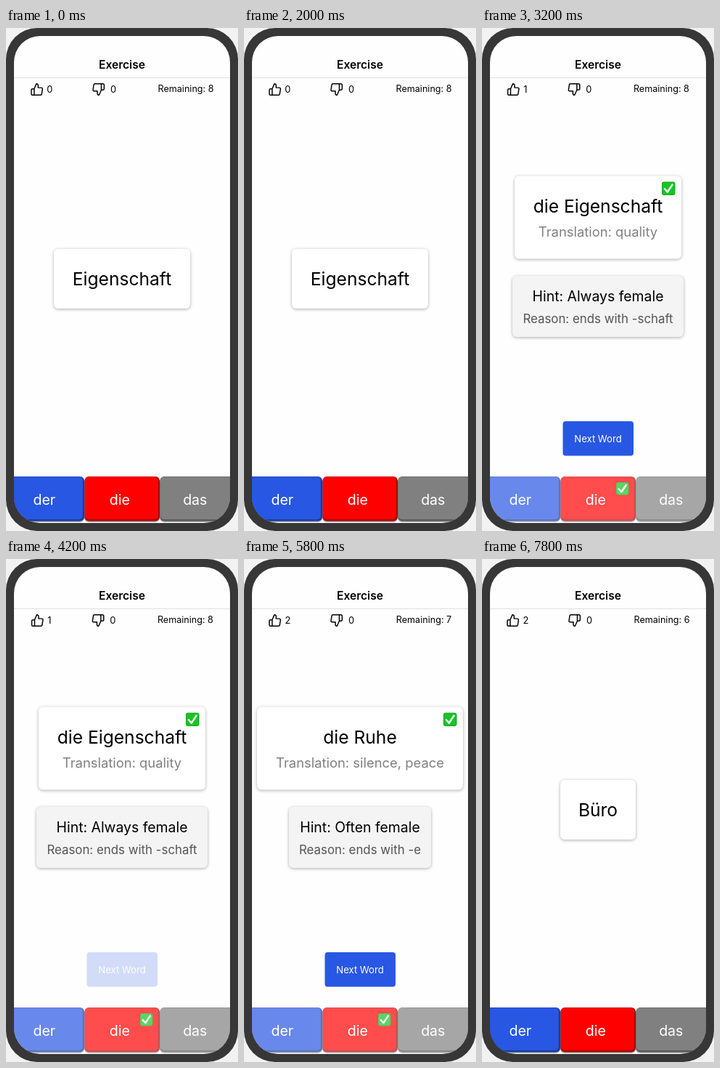
Animation, 320 px wide and 692 px high, one loop 8000 ms. Source, as an HTML page:

```html
<!DOCTYPE html>
<html lang="en">
<head>
<meta charset="utf-8">
<title>Exercise</title>
<style>
html, body { margin: 0; width: 100%; height: 100%; overflow: hidden; background: #f2f2f2; }
svg { display: block; width: 320px; height: 692px; }
text { font-family: Inter, Roboto, sans-serif; text-anchor: middle; }
.card { filter: drop-shadow(0 1.5px 2px rgba(0, 0, 0, .32)); }
.icon { fill: none; stroke: #000; stroke-width: 1.9; stroke-linecap: round; stroke-linejoin: round; }
</style>
</head>
<body>
<svg viewBox="0 0 320 692">
  <defs>
    <clipPath id="screen"><rect x="11" y="11" width="298" height="670" rx="36"/></clipPath>
    <g id="check">
      <rect width="18.5" height="18.5" rx="3" fill="#0fae1b"/>
      <rect x="1" y="1" width="16.5" height="16.5" rx="2.5" fill="#17c424"/>
      <path d="M4 9.8 7.8 14.2 14.6 4" fill="none" stroke="#fff" stroke-width="2.5" stroke-linecap="round" stroke-linejoin="round"/>
    </g>
  </defs>
  <rect width="320" height="692" rx="43" fill="#373737"/>
  <g clip-path="url(#screen)">
    <rect x="11" y="11" width="298" height="670" fill="#fefefe"/>
    <text x="160" y="55.5" font-size="15.6" font-weight="600">Exercise</text>
    <path d="M11 68.5H309" stroke="#e0e0e0"/>
    <g id="view"></g>
  </g>
</svg>
<script>
const LOOP = 8000;
const BLUE = '#2857e3';
const view = document.getElementById('view');

// w: card width, aw: answered card width, hw: hint width
const words = [
  { noun: 'Eigenschaft', w: 188, aw: 230, hw: 236, meaning: 'quality', hint: 'Always female', reason: '-schaft' },
  { noun: 'Ruhe', w: 110, aw: 284, hw: 196, meaning: 'silence, peace', hint: 'Often female', reason: '-e' },
  { noun: 'Büro', w: 104 }
];

const steps = [
  { from: 0, word: 0 },
  { from: 2200, word: 0, done: true, press: 3850 },
  { from: 4500, word: 1 },
  { from: 5800, word: 1, done: true, press: 7230 },
  { from: 7600, word: 2 }
];

const text = (s, x, y, size, fill = '#000') =>
  `<text x="${x}" y="${y}" font-size="${size}" fill="${fill}">${s}</text>`;

const card = (w, y, h, fill = '#fff') =>
  `<rect class="card" x="${160 - w / 2}" y="${y}" width="${w}" height="${h}" rx="6" fill="${fill}"/>`;

const check = (x, y, scale = 1) =>
  `<use href="#check" transform="translate(${x} ${y}) scale(${scale})"/>`;

const icon = (x, d) =>
  `<path class="icon" transform="translate(${x} 75.1) scale(.78)" d="${d}"/>`;

function scoreRow(score, remaining) {
  const dx = score === 1 ? .6 : 0;
  return icon(33.4 + dx, 'M14 9V5a3 3 0 0 0-3-3l-4 9v11h11.3a2 2 0 0 0 2-1.7l1.4-9a2 2 0 0 0-2-2.3zM7 22H4a2 2 0 0 1-2-2v-7a2 2 0 0 1 2-2h3') +
    icon(118.2 - dx, 'M10 15v4a3 3 0 0 0 3 3l4-9V2H5.7a2 2 0 0 0-2 1.7l-1.4 9a2 2 0 0 0 2 2.3zM17 2h2.7A2.3 2.3 0 0 1 22 4v7a2.3 2.3 0 0 1-2.3 2H17') +
    text(score, 60.4 - dx, 89.3, 12.8) +
    text(0, 148 - dx, 89.3, 12.8) +
    text('Remaining: ' + remaining, 248 - dx, 88, 12.6);
}

function button(label, i, fill, edge, done) {
  const x = 4 + i * 104;
  return `<g opacity="${done ? .7 : 1}">
    <rect x="${x}" y="619" width="104" height="61" rx="6" fill="#000" opacity=".3"/>
    <rect x="${x + .3}" y="617" width="103.7" height="61.5" rx="6" fill="${edge}"/>
    <rect x="${x + 1}" y="617.6" width="100.8" height="58.4" rx="5" fill="${fill}"/>
    ${text(label, x + 48.8, 656, 19.6, '#fff')}
    ${done && i === 1 ? check(185, 625, .94) : ''}</g>`;
}

const question = q => card(q.w, 304, 82) + text(q.noun, 160, 354.3, 24.6);

const answer = q =>
  card(q.aw, 203.5, 114) +
  text('die ' + q.noun, 160, 253.5, 24.6) +
  text('Translation: ' + q.meaning, 160, 287, 18.4, '#808080') +
  check(160 + q.aw / 2 - 27, 211.5) +
  card(q.hw, 341, 84, '#f4f4f4') +
  text('Hint: ' + q.hint, 160, 376, 19.4) +
  text('Reason: ends with ' + q.reason, 160, 406.3, 16.85, '#555') +
  `<g id="next"><rect x="111.5" y="541" width="97.5" height="47.5" rx="4" fill="${BLUE}"/>
    ${text('Next Word', 160, 570, 13.1, '#fff')}</g>`;

function show({ word, done }) {
  view.innerHTML = scoreRow(word + (done ? 1 : 0), 8 - word) +
    (done ? answer : question)(words[word]) +
    button('der', 0, BLUE, '#1b3a9c', done) +
    button('die', 1, '#f00', '#a30a0a', done) +
    button('das', 2, '#808080', '#585858', done);
}

let shown;
function draw(now) {
  const t = now % LOOP;
  const step = steps.findLast(s => s.from <= t);
  if (step !== shown) show(shown = step);
  if (step.done) {
    // the pressed button fades to a fifth of its strength
    const p = Math.min(1, Math.max(0, (t - step.press) / 150));
    document.getElementById('next').setAttribute('opacity', 1 - .8 * p * p * (3 - 2 * p));
  }
  requestAnimationFrame(() => draw(performance.now()));
}
draw(0);
</script>
</body>
</html>
```
